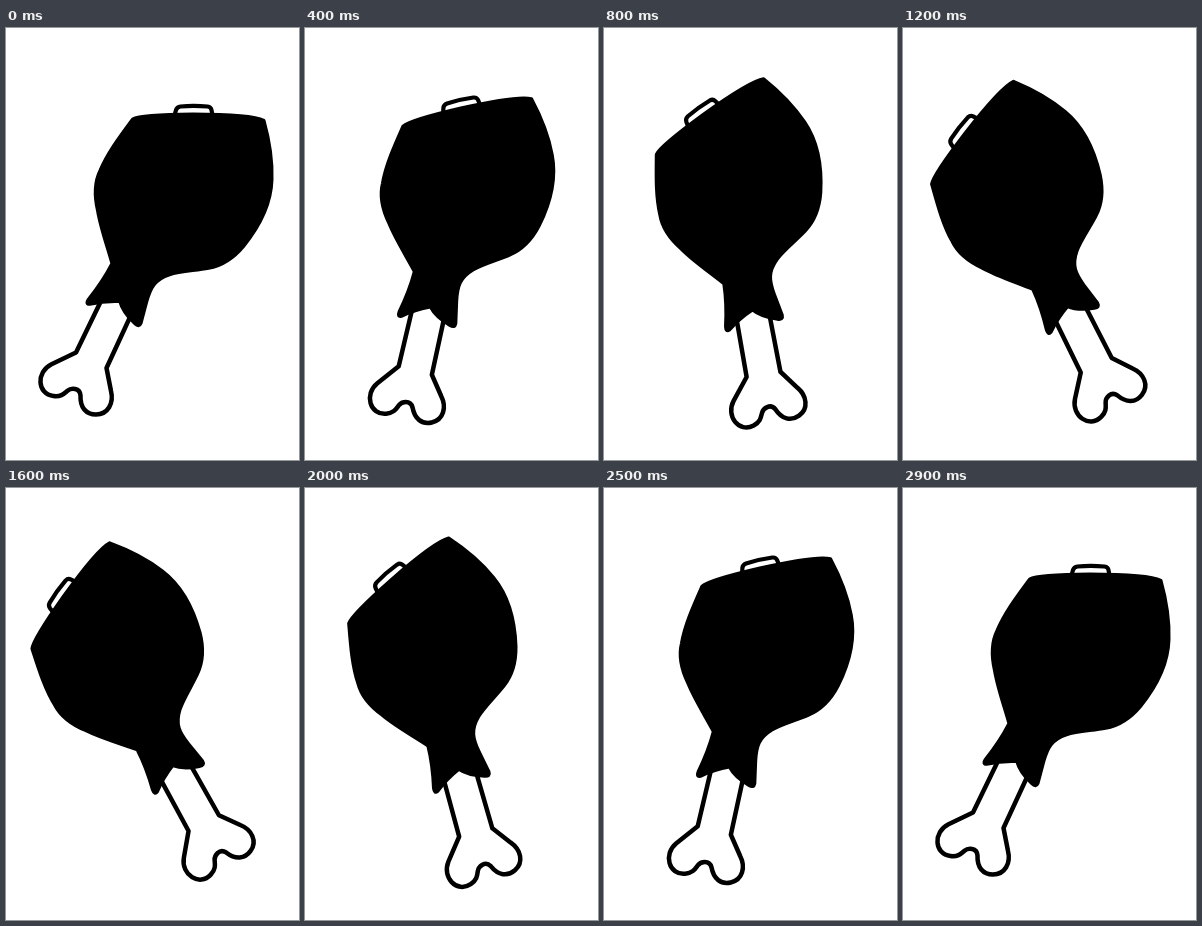
Recreate the animation shown at these times as an HTML page. Size 293 by 432 pixels, loop 3 s.

```html
<!DOCTYPE html>
<html lang="en">
<head>
<meta charset="utf-8">
<title>Swinging drumstick</title>
<style>
  html, body { margin: 0; width: 100%; height: 100%; overflow: hidden; background: #fff; }
  svg { display: block; width: 100vw; height: 100vh; }
  .line { fill: #fff; stroke: #000; stroke-width: 4.5; stroke-linejoin: round; stroke-linecap: round; }
  .meat { fill: #000; stroke: #000; stroke-width: 3.6; stroke-linejoin: round; }
</style>
</head>
<body>
<svg viewBox="0 0 293 432">
  <g id="leg">
    <path class="line" d="M94 275 L70 324.5 L45.500 336.300 C30 344 31 366 47.500 368
      C55 369 58 365.700 61.500 362.700 C65 359.700 74 359.500 74.500 367.500
      C74 379.500 80 386.500 90 386.500 C102 386.500 108 375 105 363 L100.500 340 L125 287"/>
    <path class="line" style="stroke-width:4.2" d="M168.500 87.500 L170 82 Q171 79 174.500 78.500
      Q187.500 77.300 201.500 78.500 Q205 79 205.500 82 L206.500 87.500"/>
    <path class="meat" d="M126.800 91.200 C132 88.200 152 86.500 187 86.200
      C222 86.200 250 88.500 257.700 92.500
      C263 111.500 266.300 134 265.700 151.500 C265 177.500 252.500 199.500 237.500 218
      C227.500 230 216.500 237.500 202.500 240 C189.500 242.500 174.500 243 163.500 246.500
      C148.500 251.500 144.500 259.500 140.500 273.500 L134.800 295 Q133 299.500 129 295.500
      C122.500 289.500 116.500 283 114 273.300 C103.500 272.800 92.500 274 83.500 276
      Q79.500 276 82.500 271.500 C90.500 261.500 98.500 250.500 106.200 235.500
      C101.500 218.500 94.500 199.500 91.800 182.500 C88.300 167.500 88.300 154.500 94.300 142.500
      C101.300 125.500 113.300 109.500 126.800 91.200 Z"/>
  </g>
</svg>
<script>
  const STEP = 100, LOOP = 3000;
  const PIVOT = "144.3 224";
  // Swing angle at each step from right to left; the way back mirrors it.
  const swing = [0, 1.7, 4.2, 8, 12.6, 18.1, 23.9, 29.9, 35.7, 41, 45.4, 49.1, 52, 54.3, 55.8];
  const leg = document.getElementById("leg");
  const start = performance.now();

  function draw(now) {
    const time = Math.max(0, now - start) % LOOP;
    const step = Math.floor(time / STEP);
    const pose = Math.min(step, LOOP / STEP - 1 - step);
    leg.setAttribute("transform", `rotate(${-swing[pose]} ${PIVOT})`);
    requestAnimationFrame(draw);
  }
  draw(start);
</script>
</body>
</html>
```
